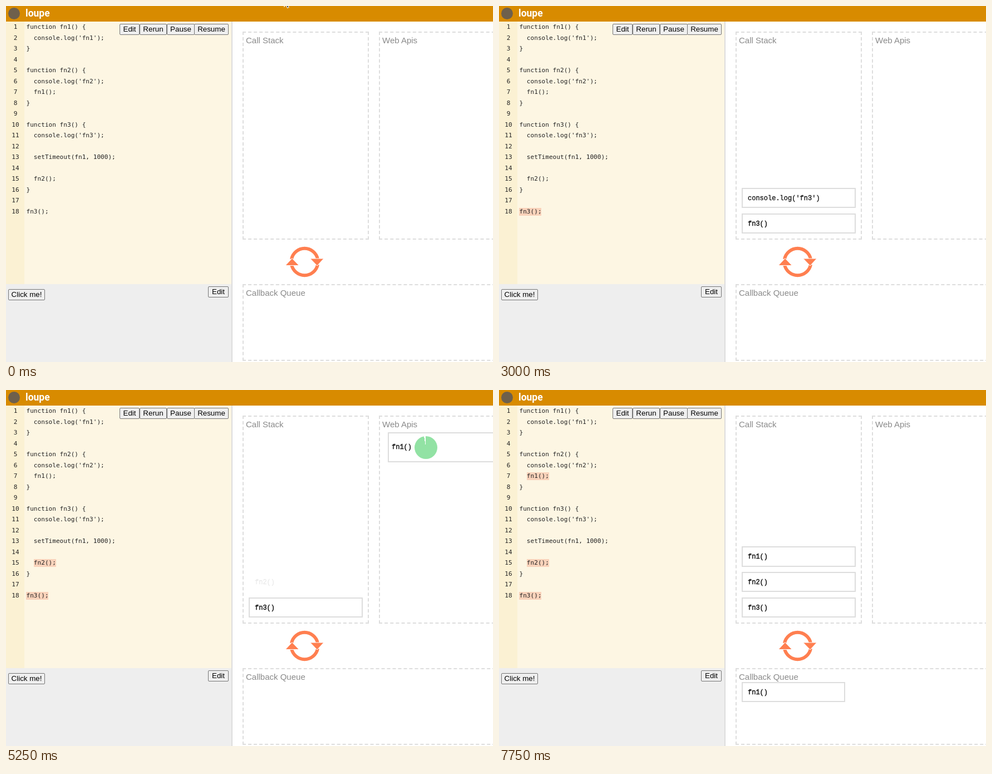
An HTML page that plays this animation: 875 by 640 pixels, repeating every 8000 ms.

```html
<!DOCTYPE html>
<html lang="en">
<head>
<meta charset="utf-8">
<title>loupe</title>
<style>
  html, body { margin: 0; width: 100%; height: 100%; overflow: hidden; background: #fff; }
  #stage { position: relative; width: 875px; height: 640px; overflow: hidden; background: #fff; }
  #stage div, #stage svg { position: absolute; box-sizing: border-box; white-space: pre; }
  .header { left: 0; top: 0; width: 875px; height: 28px; background: #d88b00; }
  .badge { left: 4px; top: 3px; width: 21px; height: 21px; border-radius: 50%; background: #6e604c; }
  .title { left: 35px; top: 0; font: bold 17.5px/26px Roboto, sans-serif; color: #fff; }
  .editor { left: 0; top: 28px; width: 405px; height: 472px; background: #fdf6e3; }
  .gutter { left: 0; top: 28px; width: 33px; height: 472px; background: #fbf1d3; }
  .page { left: 0; top: 500px; width: 405px; height: 140px; background: #eee; }
  .divider { left: 404.5px; top: 28px; width: 2px; height: 612px; background: #ddd; }
  .line, .number { height: 19.5px; font: 11.1px/19.5px "DejaVu Sans Mono", monospace; color: #222; }
  .number { left: 0; width: 34px; text-align: center; }
  .mark { height: 14px; background: #f9d2ba; }
  .button { height: 20px; border: 1px solid #767676; border-radius: 2px; background: #efefef;
    font: 13.33px/18px "Liberation Sans", Arial, sans-serif; color: #000; text-align: center; }
  .button.down { background: #dcdcdc; }
  .panel { border: 2px dashed #ddd; }
  .label { font: 15px/20px "Liberation Sans", Arial, sans-serif; color: #8a8a8a; }
  .call { height: 36.4px; border: 2px solid #ddd; background: #fff; padding-left: 9px;
    font: 12px/35px "Liberation Mono", "Courier New", monospace; color: #000;
    -webkit-text-stroke: .3px; }
  #web { padding-left: 5px; line-height: 51px; }
  #pie { left: 734px; top: 83px; width: 41px; height: 41px; border-radius: 50%; }
  #glint { left: 0; top: 0; width: 41px; height: 41px; background: #fff;
    clip-path: polygon(20px 8px, 23px 14px, 30px 13px, 23px 25px, 20px 30px); }
</style>
</head>
<body>
<div id="stage"></div>
<script>
const LOOP = 8000, STEP = 250;
const YELLOW = '#ffffc2', GREEN = '#92e2a4';
const stage = document.getElementById('stage');

function add(className, text = '', box = {}, parent = stage) {
  const el = document.createElement('div');
  el.className = className;
  el.textContent = text;
  for (const key in box) el.style[key] = box[key] + 'px';
  return parent.appendChild(el);
}

function addSvg(left, top, width, height, content) {
  stage.insertAdjacentHTML('beforeend',
    `<svg style="left:${left}px;top:${top}px" width="${width}" height="${height}">${content}</svg>`);
  return stage.lastElementChild;
}

const show = (el, on) => { el.style.visibility = on ? 'visible' : 'hidden'; };

['header', 'badge', 'editor', 'gutter', 'page', 'divider'].forEach(name => add(name));
add('title', 'loupe');

const code = `function fn1() {
  console.log('fn1');
}

function fn2() {
  console.log('fn2');
  fn1();
}

function fn3() {
  console.log('fn3');

  setTimeout(fn1, 1000);

  fn2();
}

fn3();`.split('\n');

// Highlighted line number, start, end
const marks = [
  [18, 1500, LOOP], [11, 2250, 3000], [13, 3750, 4500],
  [15, 5250, LOOP], [6, 6000, 6750], [7, 7500, LOOP]
].map(([line, from, to]) => {
  const text = code[line - 1], indent = text.search(/\S/);
  const el = add('mark', '', {
    left: 36.3 + indent * 6.68,
    top: 31 + (line - 1) * 19.5,
    width: (text.length - indent) * 6.68
  });
  return { el, from, to };
});

code.forEach((text, i) => {
  const top = 28.25 + i * 19.5;
  add('number', i + 1, { top });
  add('line', text, { left: 36.5, top });
});

const button = (text, left, top, width) => add('button', text, { left, top, width });
button('Edit', 204, 32, 36);
const rerun = button('Rerun', 240, 32, 49);
button('Pause', 289, 32, 50);
button('Resume', 338, 32, 62);
button('Edit', 363, 504, 37);
button('Click me!', 4, 509, 66);

function panel(text, left, top, width, height) {
  add('panel', '', { left, top, width, height });
  add('label', text, { left: left + 6, top: top + 6 });
}
panel('Call Stack', 425, 46, 227, 374);
panel('Web Apis', 670, 46, 300, 374);
panel('Callback Queue', 425, 499.5, 545, 138.5);

addSvg(500, 428, 74, 64, `
  <g fill="none" stroke="#ff7f50" stroke-width="6">
    <path d="M13 27A24 24 0 0 1 60 27"/>
    <path d="M13 37A24 24 0 0 0 60 37"/>
  </g>
  <path fill="#ff7f50" stroke="#fff" d="M46.5 26H71L59 39ZM2 38.5H26.5L14 25.5Z"/>`);

// Text, stack slot, start, end, text opacity and border opacity of the first step
const calls = [
  ['fn3()', 0, 1500, LOOP, .17, .4],
  ["console.log('fn3')", 1, 2250, 3250, .17, .4],
  ['setTimeout(fn1, 1000)', 1, 3750, 4750, .07, 0],
  ['fn2()', 1, 5250, LOOP, .07, 0],
  ["console.log('fn2')", 2, 6000, 7000, .07, 0],
  ['fn1()', 2, 7500, LOOP, .07, 0]
].map(([text, slot, from, to, ink, edge]) => {
  const el = add('call', text, { left: 436, top: 372.6 - slot * 45.6, width: 205 });
  return { el, from, to, ink, edge };
});

const web = add('call', 'fn1()', { left: 686, top: 76, width: 300, height: 54 });
web.id = 'web';
const pie = add('');
pie.id = 'pie';
const glint = add('', '', {}, pie);
glint.id = 'glint';
const queued = add('call', 'fn1()', { left: 436, top: 525, width: 186 });

const cursor = addSvg(0, 0, 13, 19,
  '<path d="M1 1V15L4.2 12L6.6 17.5L9 16.5L6.7 11.2H11Z" stroke="#fff" stroke-width="1.2"/>');
const cursorPath = [[499, -14], [267, 117], [239, 123], [247, 60], [255, 39]];

// Swept angle of the timer in each step after 4500 ms
const sweep = [8, 32, 280, 350];

function draw(t) {
  const within = (from, to) => t >= from && t < to;

  marks.forEach(m => show(m.el, within(m.from, m.to)));

  for (const c of calls) {
    const entering = t < c.from + STEP;
    show(c.el, within(c.from, c.to));
    c.el.style.color = `rgba(0,0,0,${entering ? c.ink : 1})`;
    c.el.style.borderColor = `rgba(221,221,221,${entering ? c.edge : 1})`;
    c.el.style.borderStyle = entering ? 'dashed' : 'solid';
  }
  // The finished log line begins to fade just before it leaves
  if (within(3000, 3250)) calls[1].el.style.color = 'rgba(0,0,0,.9)';

  const waiting = within(4500, 5500), fresh = within(4500, 4750);
  show(web, waiting);
  show(pie, waiting);
  show(glint, fresh);
  web.style.background = fresh ? YELLOW : '#fff';
  if (waiting) {
    const angle = sweep[(t - 4500) / STEP];
    pie.style.background = fresh
      ? `conic-gradient(${GREEN} ${angle}deg, transparent 0 180deg, #fff 0)`
      : `conic-gradient(${GREEN} ${angle}deg, #fff 0)`;
  }

  show(queued, t >= 5500);
  queued.style.background = t < 5750 ? YELLOW : '#fff';

  const [x, y] = cursorPath[Math.min(t / STEP, cursorPath.length - 1)];
  cursor.style.transform = `translate(${x}px, ${y}px)`;
  show(cursor, t < 1750);
  rerun.classList.toggle('down', within(1000, 1750));
}

const start = performance.now();
function tick() {
  const t = (performance.now() - start) % LOOP;
  draw(Math.floor(t / STEP) * STEP);
  requestAnimationFrame(tick);
}
tick();
</script>
</body>
</html>
```
